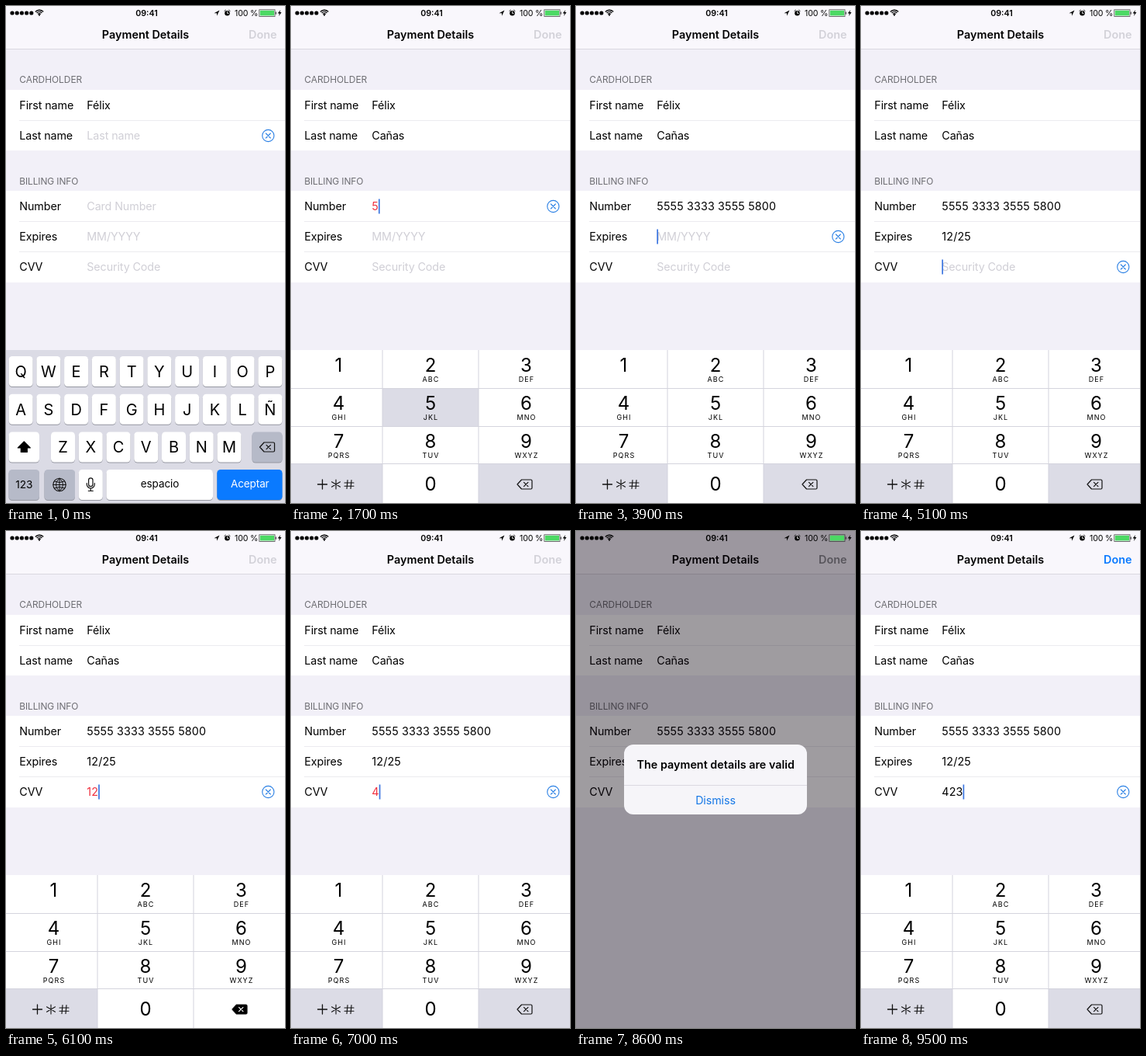
Animation, 360 px wide and 640 px high, one loop 10000 ms. Source, as an HTML page with a canvas:

```html
<!DOCTYPE html>
<html lang="en">
<head>
<meta charset="utf-8">
<title>Payment Details</title>
<style>
  html, body { margin: 0; width: 100%; height: 100%; overflow: hidden; background: #f2f0f8; }
  canvas { display: block; width: 360px; height: 640px; }
</style>
</head>
<body>
<canvas id="stage"></canvas>
<script>
const LOOP = 10000, HOLD = 80;
const BLUE = '#0a7aff', RED = '#f0303f', GRAY_KEY = '#b6bac8', PAD_GRAY = '#dcdce6', PAD_LINE = '#d4d4dd';
const canvas = document.getElementById('stage');
const ctx = canvas.getContext('2d');
const dpr = window.devicePixelRatio || 1;
canvas.width = 360 * dpr;
canvas.height = 640 * dpr;

const fields = [
  { label: 'First name', y: 128, initial: 'Félix' },
  { label: 'Last name', y: 167, hint: 'Last name' },
  { label: 'Number', y: 258, hint: 'Card Number', length: 16, format: s => s.replace(/(.{4})(?=.)/g, '$1 ') },
  { label: 'Expires', y: 297, hint: 'MM/YYYY', length: 4, format: s => s.replace(/^(..)(?=.)/, '$1/') },
  { label: 'CVV', y: 336, hint: 'Security Code', length: 3 }
];

// Key presses in order of time; '<' is the delete key.
const presses = [];
function type(field, keys, start, step) {
  [...keys].forEach((key, i) => presses.push({ field, key, time: start + i * step }));
}
type(1, 'Cañas', 150, 255);
type(2, '555533333', 1690, 90);
type(2, '5555800', 2580, 140);
type(3, '1225', 4090, 230);
type(4, '123', 5350, 200);
type(4, '<<<', 6080, 200);
type(4, '423', 6800, 300);

const clamp = v => Math.max(0, Math.min(1, v));
const ramp = (t, from, to) => {
  const v = clamp((t - from) / (to - from));
  return 1 - (1 - v) ** 3;
};

function rect(x, y, w, h, color, r = 0) {
  ctx.fillStyle = color;
  ctx.beginPath();
  ctx.roundRect(x, y, w, h, r);
  ctx.fill();
}
function circle(x, y, r, fill) {
  ctx.beginPath();
  ctx.arc(x, y, r, 0, 7);
  if (fill) { ctx.fillStyle = fill; ctx.fill(); } else ctx.stroke();
}
function path(d, x, y, { fill, stroke, width = 1.2 }) {
  ctx.save();
  ctx.translate(x, y);
  const shape = new Path2D(d);
  if (fill) { ctx.fillStyle = fill; ctx.fill(shape); }
  if (stroke) {
    ctx.strokeStyle = stroke;
    ctx.lineWidth = width;
    ctx.lineJoin = ctx.lineCap = 'round';
    ctx.stroke(shape);
  }
  ctx.restore();
}
// y is the middle of the capital letters
function text(s, x, y, { size = 14.3, color = '#000', weight = 400, align = 'left', spacing = -0.1 } = {}) {
  ctx.font = `${weight} ${size}px Inter, sans-serif`;
  ctx.letterSpacing = spacing + 'px';
  ctx.textAlign = align;
  ctx.fillStyle = color;
  ctx.fillText(s, x, y + size * 0.363);
  return ctx.measureText(s).width;
}
const centered = (s, x, y, style) => text(s, x, y, { align: 'center', ...style });

function stateAt(t) {
  const values = fields.map(f => f.initial || '');
  let last = null;
  for (const p of presses) {
    if (p.time > t) break;
    values[p.field] = p.key === '<' ? values[p.field].slice(0, -1) : values[p.field] + p.key;
    last = p;
  }
  const focus = t < 1500 ? 1 : t < 3700 ? 2 : t < 5100 ? 3 : t < 8400 || t >= 9250 ? 4 : -1;
  const focusTime = [0, -550, 1500, 3700, 5100][focus] || 0;
  const active = Math.max(focusTime, last ? last.time : -550);
  const caret = t > 8400 ? t >= 9500 : (t - active) % 1000 < 550;
  return {
    values, focus, caret,
    pressed: last && t - last.time < HOLD ? last.key : '',
    valid: fields.every((f, i) => !f.length || values[i].length === f.length)
  };
}

function drawStatus() {
  for (let i = 0; i < 5; i++) circle(8 + i * 6.2, 9, 2.6, '#000');
  ctx.strokeStyle = '#000';
  ctx.lineWidth = 1.4;
  [2.2, 4.6, 7].forEach(r => {
    ctx.beginPath();
    ctx.arc(43, 12.2, r, -Math.PI * 0.76, -Math.PI * 0.24);
    ctx.stroke();
  });
  circle(43, 11.8, 1, '#000');
  centered('09:41', 181.5, 9, { size: 10.7, weight: 600, spacing: 0 });
  path('M3.5-3.5L-3.5 .2H0V3.8Z', 272, 9, { fill: '#000' });
  circle(285.5, 9.3, 3.3, '#000');
  path('M-3.6-2.6L-2.2-3.8M3.6-2.6L2.2-3.8', 285.5, 9, { stroke: '#000', width: 0.9 });
  path('M0-1.8V.5H1.6', 285.5, 9, { stroke: '#fff', width: 0.8 });
  text('100 %', 295, 9, { size: 10.6, spacing: -0.15 });
  ctx.strokeStyle = '#333';
  ctx.lineWidth = 0.7;
  ctx.strokeRect(326.8, 4.8, 20.2, 8.6);
  rect(327.8, 5.8, 18.2, 6.6, '#4cd964');
  rect(347.6, 7.5, 1.2, 3.2, '#333');
  path('M1.2-4L-2.4 .6H-.1L-1 4L2.5-.9H.3Z', 353, 9, { fill: '#000' });
}

function drawForm(s, dimmed) {
  rect(0, 0, 360, 640, '#f2f0f8');
  rect(0, 0, 360, 55, '#f9f7fc');
  rect(0, 55, 360, 0.7, '#d2d1d8');
  centered('Payment Details', 180, 37, { size: 14.4, weight: 600, spacing: 0 });
  text('Done', 349.5, 37, {
    size: 14.4, weight: 600, align: 'right', spacing: 0,
    color: dimmed ? '#8b8b90' : s.valid ? BLUE : '#d3d2d9'
  });
  text('CARDHOLDER', 17.3, 95, { size: 11.9, color: '#6d6d72', spacing: 0 });
  text('BILLING INFO', 17.3, 225.5, { size: 11.9, color: '#6d6d72' });
  rect(0, 108, 360, 78, '#fff');
  rect(0, 238, 360, 118, '#fff');
  [147, 277, 316].forEach(y => rect(17, y, 343, 0.8, '#e6e5ea'));

  fields.forEach((f, i) => {
    const value = s.values[i];
    const shown = f.format ? f.format(value) : value;
    const invalid = f.length && value.length < f.length;
    text(f.label, 17.3, f.y);
    const width = text(shown || f.hint, 104.3, f.y, {
      color: !shown ? '#d0cfd6' : invalid ? RED : '#000',
      spacing: shown && f.length ? 0.15 : -0.1
    });
    if (i !== s.focus) return;
    if (s.caret) rect(104.3 + (shown ? width : 0), f.y - 9.5, 1.7, 19, '#3c76e0');
    ctx.strokeStyle = '#2b80e4';
    ctx.lineWidth = 1.1;
    circle(338.3, f.y, 7.6);
    path('M-3-3L3 3M3-3L-3 3', 338.3, f.y, { stroke: '#2b80e4', width: 1.1 });
  });
}

function drawDelete(x, y, filled) {
  const body = 'M-9.5 0L-4-6H8Q9.5-6 9.5-4.5V4.5Q9.5 6 8 6H-4Z';
  path(body, x, y, { stroke: '#111', fill: filled ? '#000' : null });
  path('M-1-2.7L4.4 2.7M4.4-2.7L-1 2.7', x, y, { stroke: filled ? '#fff' : '#111' });
}

function drawKey(x, y, w, color = '#fff') {
  rect(x, y + 1, w, 39, '#9698a2', 4.5);
  rect(x, y, w, 39, color, 4.5);
}

function drawLetters(s) {
  const upper = !s.values[1];
  const rows = [['QWERTYUIOP', 3.6, 451], ['ASDFGHJKLÑ', 3.6, 499.8], ['ZXCVBNM', 58, 548.5]];
  let popup = null;
  rect(0, 443, 360, 197, '#dbdbe5');
  for (const [letters, left, y] of rows) {
    [...letters].forEach((letter, i) => {
      const x = left + i * 35.75;
      const face = upper ? letter : letter.toLowerCase();
      drawKey(x, y, 31);
      centered(face, x + 15.5, y + 19.5, { size: 20, spacing: 0 });
      if (s.pressed && s.pressed.toUpperCase() === letter) popup = { x, y, face: s.pressed };
    });
  }
  drawKey(3.5, 548.5, 39.5, upper ? '#fff' : GRAY_KEY);
  path('M0-7L8 1H4V6.5H-4V1H-8Z', 23.3, 568, { fill: upper ? '#000' : null, stroke: '#000' });
  drawKey(317.5, 548.5, 39, GRAY_KEY);
  drawDelete(337, 568);

  drawKey(3.5, 597, 39.5, GRAY_KEY);
  centered('123', 23.3, 616.5, { size: 13.7 });
  drawKey(49.5, 597, 39.5, GRAY_KEY);
  ctx.strokeStyle = '#111';
  ctx.lineWidth = 1.1;
  circle(69, 616.5, 8.2);
  path('M-8 0H8M0-8V8M0-8C-6-4-6 4 0 8M0-8C6-4 6 4 0 8M-6.3-4.3Q0-1.5 6.3-4.3M-6.3 4.3Q0 1.5 6.3 4.3',
    69, 616.5, { stroke: '#111', width: 1 });
  drawKey(93.8, 597, 31);
  path('M-2.7-5.5a2.7 2.7 0 0 1 5.4 0V0a2.7 2.7 0 0 1-5.4 0ZM-5-1.5V0a5 5 0 0 0 10 0V-1.5M0 5V8.5M-3 8.5H3',
    109.3, 616, { stroke: '#111' });
  drawKey(129.5, 597, 137.5);
  centered('espacio', 198.5, 615.5, { size: 13.5 });
  drawKey(272.3, 597, 84.2, BLUE);
  centered('Aceptar', 314.8, 615.5, { size: 13.5, color: '#fff' });

  if (popup) {
    const left = Math.max(1, Math.min(311, popup.x - 8.5));
    ctx.save();
    ctx.shadowColor = 'rgba(0,0,0,.3)';
    ctx.shadowBlur = 4 * dpr;
    rect(left, popup.y - 52, 48, 50, '#fff', 8);
    ctx.restore();
    rect(popup.x, popup.y - 10, 31, 49, '#fff', 4.5);
    centered(popup.face, left + 24, popup.y - 27, { size: 31, spacing: 0 });
  }
}

function drawPad(pressed) {
  const labels = ['', 'ABC', 'DEF', 'GHI', 'JKL', 'MNO', 'PQRS', 'TUV', 'WXYZ'];
  const edges = [0, 118, 242, 360], tops = [443, 493, 542, 590, 640];
  const centers = [61.5, 180, 303.5];
  const cell = (col, row, color) =>
    rect(edges[col], tops[row], edges[col + 1] - edges[col], tops[row + 1] - tops[row], color);
  const digit = (n, x, y) => centered(n, x, y, { size: 24, spacing: 0 });
  rect(0, 443, 360, 197, '#fff');
  labels.forEach((label, i) => {
    const col = i % 3, row = Math.floor(i / 3), n = String(i + 1);
    if (pressed === n) cell(col, row, PAD_GRAY);
    digit(n, centers[col], 462 + row * 49.1);
    centered(label, centers[col] + 0.5, 480.7 + row * 49.1, { size: 9, spacing: 1.1 });
  });
  cell(0, 3, PAD_GRAY);
  if (pressed === '0') cell(1, 3, PAD_GRAY);
  if (pressed !== '<') cell(2, 3, PAD_GRAY);
  digit('0', 180, 615.5);
  path('M-6 0H6M0-6V6', 40.5, 616, { stroke: '#111', width: 1.3 });
  path('M0-6V6M-5.5-3.2L5.5 3.2M-5.5 3.2L5.5-3.2', 58, 616, { stroke: '#111', width: 1.1 });
  path('M-2-5.5L-3 5.5M3-5.5L2 5.5M-6-2H6M-6 2.2H6', 75, 616, { stroke: '#111', width: 1.1 });
  drawDelete(301.5, 616, pressed === '<');
  tops.slice(1, 4).forEach(y => rect(0, y - 1, 360, 1, PAD_LINE));
  edges.slice(1, 3).forEach(x => rect(x - 0.5, 443, 1, 197, PAD_LINE));
}

function drawAlert(alpha, scale) {
  ctx.save();
  ctx.globalAlpha = alpha;
  ctx.translate(180, 320);
  ctx.scale(scale, scale);
  ctx.translate(-180, -320);
  rect(62, 275, 236, 90, '#f6f5f9', 12);
  rect(62, 327, 236, 0.8, '#d2d1d8');
  centered('The payment details are valid', 180.3, 301, { weight: 600, spacing: 0.03 });
  centered('Dismiss', 180, 347.3, { color: '#1577e6' });
  ctx.restore();
}

function draw(t) {
  const state = stateAt(t);
  const opening = ramp(t, 8350, 8570), closing = ramp(t, 9000, 9300);
  const shown = opening * (1 - closing);
  const keyboardDrop = 198 * ramp(t, 8350, 8580) * (1 - ramp(t, 9050, 9400));
  ctx.setTransform(dpr, 0, 0, dpr, 0, 0);
  drawForm(state, shown > 0.3);
  ctx.save();
  ctx.translate(0, keyboardDrop);
  if (t < 1500) drawLetters(state); else drawPad(state.pressed);
  ctx.restore();
  if (shown > 0) {
    rect(0, 0, 360, 640, `rgba(8,2,12,${0.39 * shown})`);
    drawAlert(shown, 1.18 - 0.18 * opening);
  }
  drawStatus();
}

const start = performance.now();
function frame() {
  draw((performance.now() - start) % LOOP);
  requestAnimationFrame(frame);
}
frame();
</script>
</body>
</html>
```
